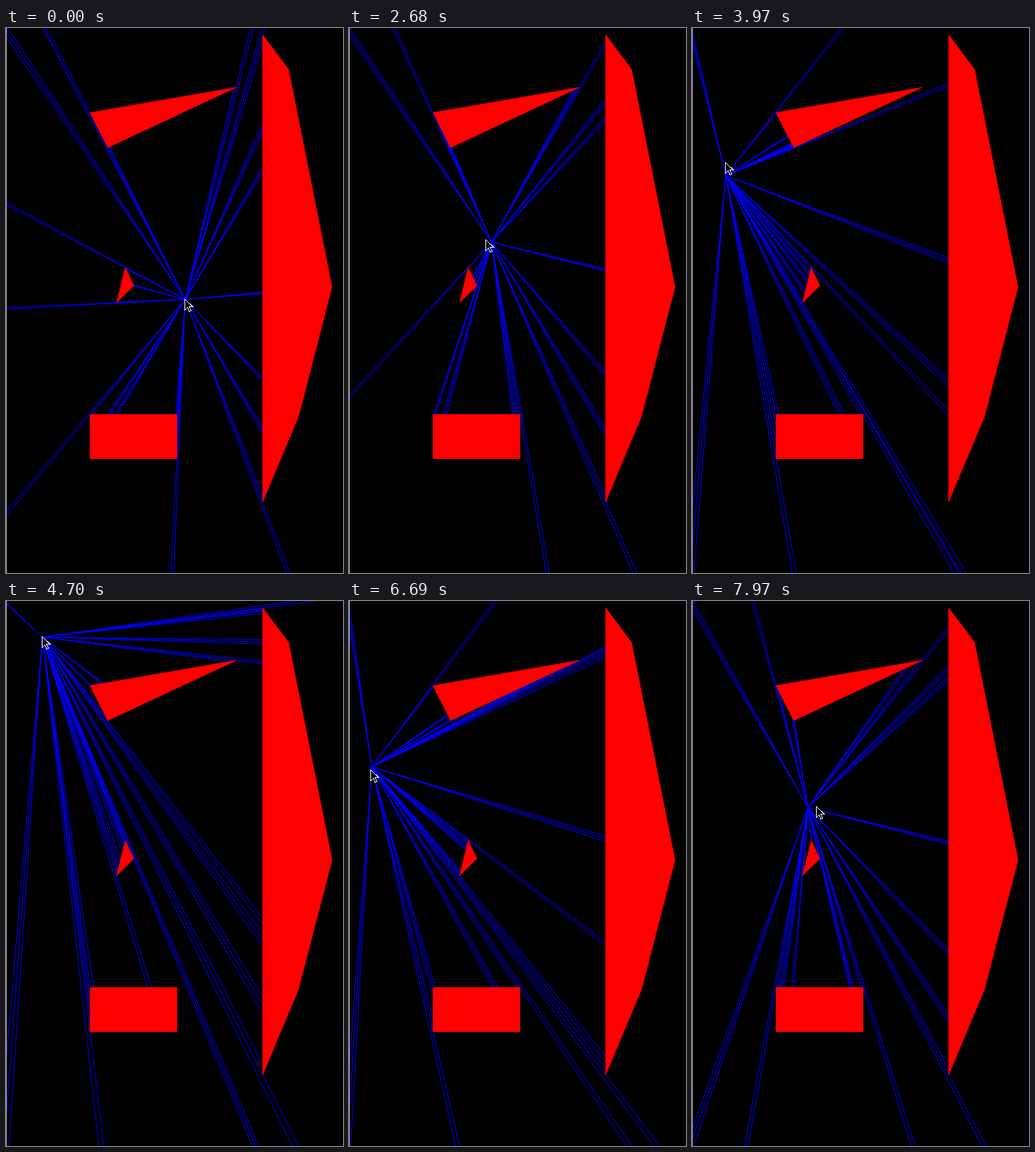
These frames come from a looping animation (489 px wide and 789 px high, 8 s). An HTML page:

```html
<!DOCTYPE html>
<html lang="en">
<head>
<meta charset="utf-8">
<title>Ray casting</title>
<style>
  html, body { margin: 0; width: 100%; height: 100%; overflow: hidden; background: #000; }
  svg { display: block; width: 489px; height: 789px; }
</style>
</head>
<body>
<svg viewBox="0 0 489 789">
  <rect width="489" height="789"/>
  <path id="rays" fill="none" stroke="#00f"/>
  <path id="walls" fill="#f00" stroke="#f00" stroke-width=".8"/>
  <rect width="1" height="789" fill="#bbb"/>
  <path id="cursor" d="M.5 .5V16.5L4.5 12.5L7 18.5L9.5 17.5L7 11.5H12Z" stroke="#fff" shape-rendering="crispEdges"/>
</svg>
<script>
const LOOP = 8000, START = 1440, LEAD = 40, SPREAD = 0.01, NUDGE = 1e-5;

const box = (x, y, w, h) => [[x, y], [x + w, y], [x + w, y + h], [x, y + h]];
const shapes = [
  [[372.4, 10], [410, 60], [473, 375], [424.5, 562], [372.4, 686]],
  [[122, 122.5], [334, 86], [147.5, 173]],
  [[173, 347], [185.5, 373], [160.5, 397.5]],
  box(122, 559.5, 126, 64)
];
const all = [...shapes, box(-3, 0, 498, 789)];
const corners = all.flat();
const edges = all.flatMap(s => s.map((p, i) => [p, s[(i + 1) % s.length]]));

// Light path: time, x, y
const keys = [
  [START, 260, 393], [2250, 290, 345], [2680, 207, 310], [3300, 90, 262], [3800, 52, 240],
  [3970, 49, 214], [4200, 48, 95], [4950, 54, 50], [5230, 54, 50], [5680, 53, 91],
  [6690, 33, 240], [7100, 30, 264], [7250, 30, 264], [7480, 45, 297], [7970, 168, 299],
  [8050, 188, 297]
];

const same = (a, b) => a[1] === b[1] && a[2] === b[2];

// The light comes to rest at both ends and wherever two keys agree.
function slope(i, axis) {
  const a = keys[i - 1], k = keys[i], b = keys[i + 1];
  if (!a || !b || same(a, k) || same(k, b)) return 0;
  return (b[axis] - a[axis]) / (b[0] - a[0]);
}

function place(t) {
  let i = 0;
  while (i < keys.length - 2 && keys[i + 1][0] <= t) i++;
  const a = keys[i], b = keys[i + 1], span = b[0] - a[0];
  const u = Math.max(0, Math.min(1, (t - a[0]) / span)), v = 1 - u;
  return [1, 2].map(n =>
    v * v * (1 + 2 * u) * a[n] + u * u * (3 - 2 * u) * b[n] +
    u * v * span * (v * slope(i, n) - u * slope(i + 1, n)));
}

function cast([x, y], angle) {
  const dx = Math.cos(angle), dy = Math.sin(angle);
  let best = 2000;
  for (const [p, q] of edges) {
    const ex = q[0] - p[0], ey = q[1] - p[1];
    const det = dx * ey - dy * ex;
    if (!det) continue;
    const px = p[0] - x, py = p[1] - y;
    const dist = (px * ey - py * ex) / det;
    const along = (px * dy - py * dx) / det;
    if (dist > 0 && along >= 0 && along <= 1 && dist < best) best = dist;
  }
  return best;
}

function rayPath(light) {
  const [x, y] = light;
  const ray = (a, d) =>
    `M${x.toFixed(2)} ${y.toFixed(2)}l${(d * Math.cos(a)).toFixed(2)} ${(d * Math.sin(a)).toFixed(2)}`;
  return corners.map(([cx, cy]) => {
    const a = Math.atan2(cy - y, cx - x);
    // The middle ray slips past a corner that it only grazes.
    const mid = Math.max(cast(light, a - NUDGE), cast(light, a + NUDGE));
    return ray(a, mid) + [a - SPREAD, a + SPREAD].map(b => ray(b, cast(light, b))).join('');
  }).join('');
}

const el = id => document.getElementById(id);
const rays = el('rays'), cursor = el('cursor');
el('walls').setAttribute('d', shapes.map(s => `M${s.join('L')}Z`).join(''));

function draw(t) {
  rays.setAttribute('d', rayPath(place(t)));
  // The pointer runs slightly ahead of the light.
  const [x, y] = place(t < START ? t : t + LEAD).map(Math.round);
  cursor.setAttribute('transform', `translate(${x - 1} ${y - 1})`);
}

const start = performance.now();
function tick() {
  draw((performance.now() - start) % LOOP);
  requestAnimationFrame(tick);
}
tick();
</script>
</body>
</html>
```
